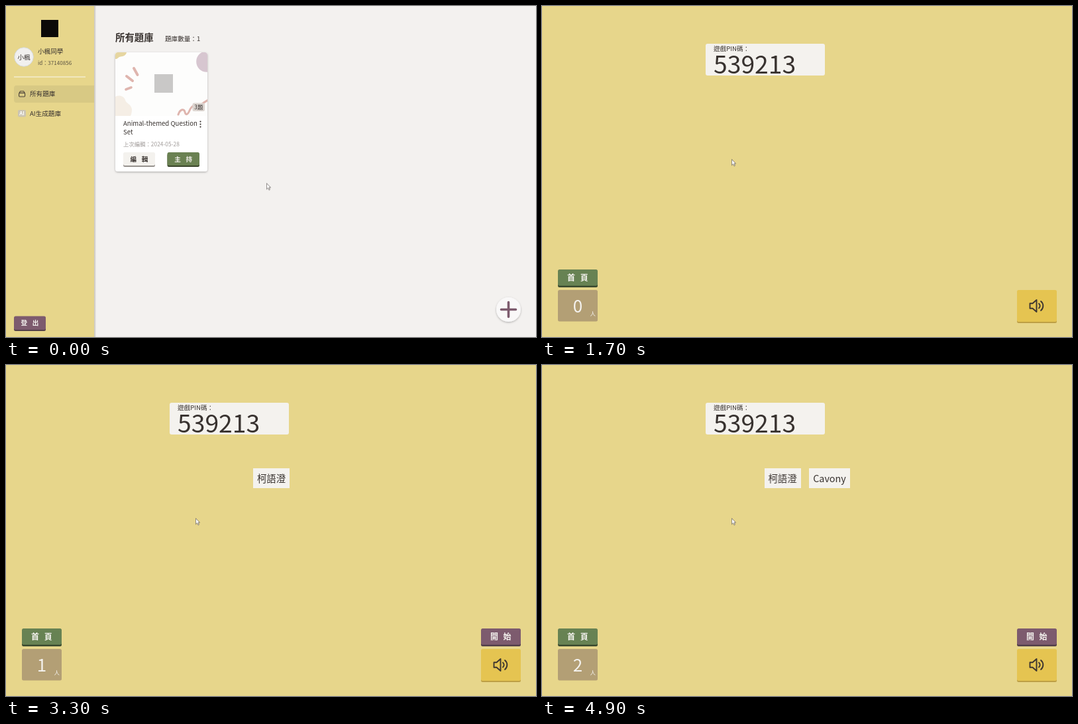
An HTML page for the animation above (5 s loop, 800 px wide and 500 px high).

```html
<!DOCTYPE html>
<html lang="zh-Hant">
<head>
<meta charset="utf-8">
<title>Quiz lobby</title>
<style>
html, body { margin: 0; width: 100%; height: 100%; overflow: hidden; background: #e7d68b; }
svg { display: block; width: 100vw; height: 100vh; }
text {
  font-family: "Noto Sans CJK TC", "Noto Sans CJK JP", "Noto Sans CJK", "Noto Sans", sans-serif;
  font-size: 9.6px; fill: #38322f; white-space: pre;
}
.med { font-weight: 500; }
.bold { font-weight: 700; }
.small { font-size: 8.4px; }
.light { fill: #f4f2ee; }
.mid { text-anchor: middle; }
.purple { fill: #7d5b6e; }
.purple-edge { fill: #53404a; }
.paper { fill: #f4f2ee; }
.big { font-size: 12px; }
.name { font-size: 14.4px; text-anchor: middle; }
.count { font-size: 26px; font-weight: 500; text-anchor: middle; }

.home, .lobby, .press, .none, .one, .two, .cursor { animation: 5s step-end infinite; }
.home { animation-name: home; }
.lobby { animation-name: lobby; }
.press { animation-name: press; }
.none { animation-name: none-in; }
.one { animation-name: one; }
.two { animation-name: two; }
.first { animation: 5s step-end infinite shift; }
.cursor { animation-name: move; animation-timing-function: linear; }

@keyframes home { 0% { opacity: 1 } 34%, 100% { opacity: 0 } }
@keyframes lobby { 0% { opacity: 0 } 34%, 100% { opacity: 1 } }
@keyframes press { 0% { opacity: 0 } 32%, 100% { opacity: 1 } }
@keyframes none-in { 0% { opacity: 1 } 50%, 100% { opacity: 0 } }
@keyframes one { 0% { opacity: 0 } 50% { opacity: 1 } 78%, 100% { opacity: 0 } }
@keyframes two { 0% { opacity: 0 } 78%, 100% { opacity: 1 } }
@keyframes shift {
  0% { opacity: 0; transform: translateX(0) }
  50% { opacity: 1; transform: translateX(0) }
  78%, 100% { opacity: 1; transform: translateX(-37.5px) }
}
@keyframes move {
  0% { transform: translate(393px, 267.5px); animation-timing-function: cubic-bezier(.4, 0, .3, 1) }
  18% { transform: translate(295.5px, 232.3px); animation-timing-function: ease-out }
  24%, 100% { transform: translate(286px, 231.3px) }
}
</style>
</head>
<body>
<svg viewBox="0 0 800 500" preserveAspectRatio="none">
  <defs>
    <filter id="soft" x="-20%" y="-20%" width="140%" height="140%">
      <feDropShadow dx="0" dy="1.2" stdDeviation="1.4" flood-color="#000" flood-opacity=".28"/>
    </filter>
    <linearGradient id="side">
      <stop offset="0" stop-color="#8f8a80" stop-opacity=".45"/>
      <stop offset="1" stop-color="#8f8a80" stop-opacity="0"/>
    </linearGradient>
    <clipPath id="cover"><path d="M165 166V74a4 4 0 0 1 4-4h131a4 4 0 0 1 4 4v92z"/></clipPath>
  </defs>

  <g class="home">
    <rect width="800" height="500" fill="#f3f1ef"/>
    <rect x="133" width="3.5" height="500" fill="url(#side)"/>
    <rect width="133" height="500" fill="#e7d68b"/>

    <!-- sidebar -->
    <rect x="53" y="21" width="26" height="26" fill="#0c0a08"/>
    <circle cx="27" cy="77" r="14.3" fill="#f1f0ee" stroke="#d5d9da" stroke-width="1"/>
    <text class="mid med" x="27" y="80.5">小楓</text>
    <text class="med" x="48" y="72.2">小楓同學</text>
    <text x="48" y="88.6" style="font-size:8.1px;fill:#5c5443">id：37140856</text>
    <rect x="12" y="106.5" width="108" height="1.2" fill="#f8f3e0"/>
    <path d="M133 120H16a4 4 0 0 0-4 4v18a4 4 0 0 0 4 4h117z" fill="#d8c984"/>
    <g fill="none" stroke="#4a4238" stroke-width="1.1" stroke-linejoin="round">
      <rect x="19.6" y="131.4" width="9" height="5.6" rx="1.2"/>
      <path d="M20 131.4l1.6-2.6h5l1.6 2.6"/>
    </g>
    <text class="med" x="36" y="136.3">所有題庫</text>
    <rect x="18" y="157" width="12" height="10.6" rx="2" fill="#cbc4b2"/>
    <text class="mid bold" x="24" y="165.2" style="font-size:7.6px;fill:#fff">AI</text>
    <text class="med" x="36" y="165.8">AI生成題庫</text>
    <rect class="purple-edge" x="12" y="471" width="48" height="20" rx="2.5"/>
    <rect class="purple" x="12" y="468.5" width="48" height="20.5" rx="2.5"/>
    <text class="bold light" x="22.4 39.8" y="482.4">登出</text>

    <!-- heading -->
    <text class="bold" x="165" y="53" style="font-size:14.4px">所有題庫</text>
    <text class="med" x="240" y="52.6">題庫數量：1</text>

    <!-- card -->
    <rect x="165" y="70" width="139" height="180" rx="4" fill="#fff" filter="url(#soft)"/>
    <g clip-path="url(#cover)">
      <rect x="165" y="70" width="139" height="96" fill="#fdfdfc"/>
      <path d="M165 70h17c-1 5-5 6-9 6.500s-4 4-8 3.500z" fill="#e6d6a0"/>
      <circle cx="303" cy="84" r="15.800" fill="#d7c6d0"/>
      <path d="M165 137c6-3 13-1 15 5 1 5 9 6 10 14 0 5-1 8-2 10h-23z" fill="#f5eee5"/>
      <g fill="none" stroke="#dfb5ae" stroke-linecap="round" stroke-linejoin="round">
        <path d="M193 94l5.500 10" stroke-width="4"/>
        <path d="M182 106l9 7" stroke-width="4"/>
        <path d="M181 126l8-3" stroke-width="3.600"/>
        <path d="M260 164c3-9 9-9 10-4s4 5 7-2 8-10 10-5 5 3 7-2 7-6 11-9" stroke-width="3"/>
      </g>
      <rect x="224" y="103" width="28" height="28" fill="#c9c8c7"/>
    </g>
    <rect x="281.500" y="146.500" width="18.500" height="12.500" rx="2.500" fill="#dcd5d0"/>
    <text class="mid med small" x="290.800" y="156">3題</text>
    <text class="med" x="177" y="181">Animal-themed Question</text>
    <text class="med" x="177" y="194.200">Set</text>
    <g fill="#38322f">
      <circle cx="293.500" cy="174.600" r="1.100"/>
      <circle cx="293.500" cy="178.600" r="1.100"/>
      <circle cx="293.500" cy="182.600" r="1.100"/>
    </g>
    <text class="small" x="177" y="212" style="fill:#a09b99">上次編輯：2024-05-28</text>

    <rect x="177" y="223" width="48" height="20" rx="2.500" fill="#96918d"/>
    <rect class="paper" x="177" y="221" width="48" height="20" rx="2.500"/>
    <text class="bold" x="187.400 204.800" y="234.600">編輯</text>
    <rect x="243.500" y="223" width="48.500" height="20" rx="2.500" fill="#39452a"/>
    <rect x="243.500" y="221" width="48.500" height="20" rx="2.500" fill="#6a8152"/>
    <rect class="press" x="243.500" y="221" width="48.500" height="22" rx="2.500" fill="#333a24"/>
    <text class="bold light" x="254.200 271.600" y="234.600">主持</text>

    <!-- add button -->
    <circle cx="758.500" cy="458.500" r="18.500" fill="#f9f8f8" filter="url(#soft)"/>
    <path d="M747.500 458.500h22M758.500 447.500v22" stroke="#7d5b6e" stroke-width="3.600" stroke-linecap="round"/>
  </g>

  <g class="lobby">
    <rect width="800" height="500" fill="#e7d68b"/>
    <rect class="paper" x="247" y="57" width="180" height="48" rx="3"/>
    <text class="med" x="259" y="68">遊戲PIN碼：</text>
    <text x="259" y="102" style="font-size:37.3px">539213</text>

    <rect x="24" y="401" width="60" height="24" rx="2.500" fill="#3b4a2f"/>
    <rect x="24" y="398" width="60" height="24.500" rx="2.500" fill="#678253"/>
    <text class="bold light big" x="38 57.800" y="415">首頁</text>
    <rect x="24" y="429" width="60" height="47.500" rx="2.500" fill="#b39f75"/>
    <text class="count light none" x="54" y="463">0</text>
    <text class="count light one" x="54" y="463">1</text>
    <text class="count light two" x="54" y="463">2</text>
    <text class="light" x="72.500" y="468" style="font-size:8.4px">人</text>

    <rect x="717" y="432" width="60" height="47" rx="2.500" fill="#bd9f45"/>
    <rect x="717" y="429" width="60" height="48" rx="2.500" fill="#e5c451"/>
    <g fill="none" stroke="#3c3530" stroke-width="1.900" stroke-linecap="round" stroke-linejoin="round">
      <path d="M736.500 449.300h4l6-5.300v18l-6-5.300h-4z"/>
      <path d="M750 449.500a4.500 4.500 0 0 1 0 7M753 446a9 9 0 0 1 0 14"/>
    </g>

    <!-- players -->
    <g class="first">
      <rect class="paper" x="373" y="156" width="55" height="30"/>
      <text class="name" x="400.500" y="177">柯語澄</text>
    </g>
    <g class="two">
      <rect class="paper" x="403" y="156" width="62" height="30"/>
      <text class="name" x="434" y="177">Cavony</text>
    </g>
    <g class="one">
      <rect class="purple-edge" x="717" y="401" width="60" height="24" rx="2.500"/>
      <rect class="purple" x="717" y="398" width="60" height="24.500" rx="2.500"/>
      <text class="bold light big" x="731 750.500" y="415">開始</text>
    </g>
    <g class="two">
      <rect class="purple-edge" x="717" y="401" width="60" height="24" rx="2.500"/>
      <rect class="purple" x="717" y="398" width="60" height="24.500" rx="2.500"/>
      <text class="bold light big" x="731 750.500" y="415">開始</text>
    </g>
  </g>

  <g class="cursor">
    <path d="M.4.300V9.300L2.500 7.300 4 10.500 5.400 9.800 4 6.800H6.600Z" fill="#fff" stroke="#55504c" stroke-width=".7" stroke-linejoin="round"/>
  </g>
</svg>
</body>
</html>
```
